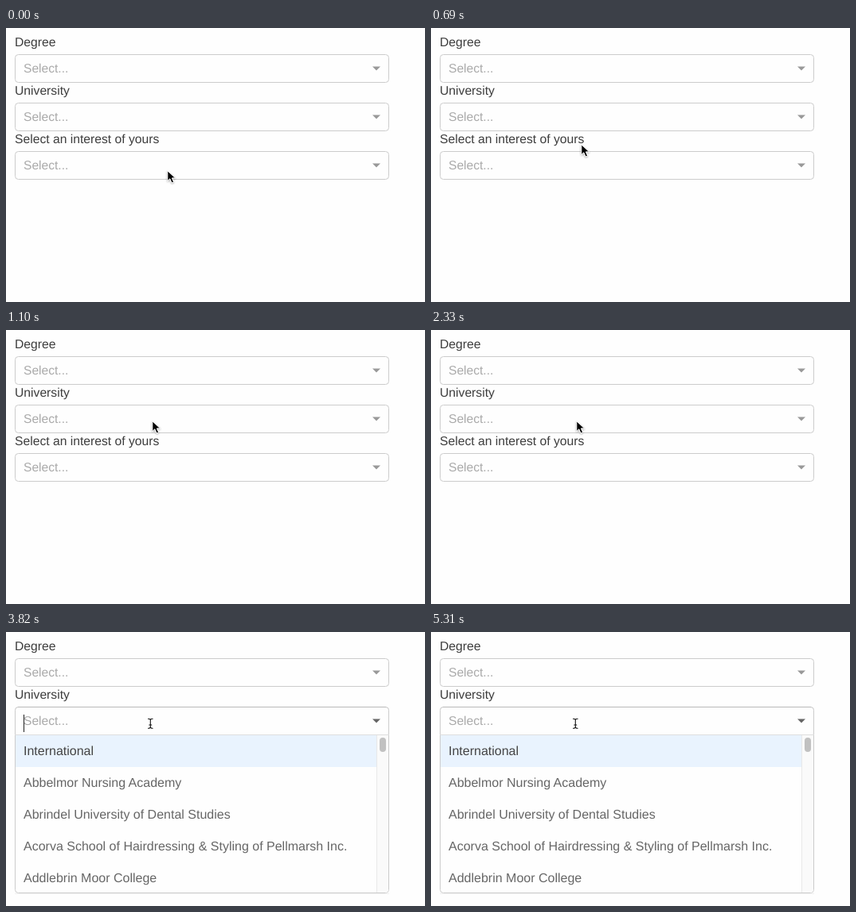
Animation, 526 px wide and 345 px high, one loop 8000 ms. Source, as an HTML page:

```html
<!DOCTYPE html>
<html lang="en">
<head>
<meta charset="utf-8">
<title>Select menus</title>
<style>
html, body { margin: 0; width: 100%; height: 100%; overflow: hidden; background: #fefefe; }
svg { display: block; width: 526px; height: 345px; }
text { font-family: "Liberation Sans", Arial, sans-serif; text-rendering: geometricPrecision; }
.label { font-size: 15.7px; fill: #3d3d3d; }
.hint { font-size: 15.6px; fill: #aaa; }
.option { font-size: 16px; fill: #666; }
.box { fill: #fefefe; stroke: #ccc; }
</style>
</head>
<body>
<svg viewBox="0 0 526 345">
  <defs>
    <clipPath id="listClip"><path d="M12 130H480V324Q480 328 476 328H16Q12 328 12 324Z"/></clipPath>
    <filter id="shade" x="-50%" y="-50%" width="200%" height="200%">
      <feDropShadow dx="0" dy="1" stdDeviation="0.8" flood-opacity="0.35"/>
    </filter>
  </defs>
  <g id="fields"></g>
  <g id="menu">
    <path d="M11 329.5H481" stroke="#000" stroke-opacity=".05"/>
    <path class="box" d="M11.5 129.5V324.5Q11.5 328.5 15.5 328.5H476.5Q480.5 328.5 480.5 324.5V129.5"/>
    <path class="box" d="M11.5 129.5V98.5Q11.5 94.5 15.5 94.5H476.5Q480.5 94.5 480.5 98.5V129.5"/>
    <path d="M15 94.5H477" stroke="#b9b9b9"/>
    <path d="M12 129.5H480" stroke="#dedede"/>
    <path d="M460 109.5h10l-5 5z" fill="#666"/>
    <text class="hint" x="22" y="117">Select...</text>
    <g id="list" clip-path="url(#listClip)">
      <rect x="12" y="130" width="454" height="40" fill="#e9f3fe"/>
      <rect x="465" y="130" width="15" height="198" fill="#fafafa"/>
      <path d="M465.5 130V328" stroke="#e8e8e8"/>
      <rect x="469" y="133" width="8" height="18" rx="4" fill="#c1c1c1"/>
    </g>
    <rect id="caret" x="22" y="104" width="1" height="22" fill="#222"/>
    <g fill="none" stroke-linecap="round">
      <path id="beamHalo" stroke="#fff" stroke-width="2.6"/>
      <path id="beam" stroke="#111" stroke-width="1.1"/>
    </g>
  </g>
  <g id="pointer" filter="url(#shade)">
    <path d="M.8 .8V13.6L3.8 10.8 6 16 8.6 14.9 6.4 9.9H10.6Z" fill="#000" stroke="#fff" stroke-width="1"/>
  </g>
</svg>
<script>
const LOOP = 8000, OPEN = 3820;
const labels = ["Degree", "University", "Select an interest of yours"];
const options = [
  "International",
  "Abbelmor Nursing Academy",
  "Abrindel University of Dental Studies",
  "Acorva School of Hairdressing & Styling of Pellmarsh Inc.",
  "Addlebrin Moor College"
];
// time, x, y of the pointer tip
const path = [
  [510, 202, 179], [690, 188, 146], [840, 185, 131],
  [1100, 183, 114], [2300, 183, 114], [2410, 180, 114]
];
const blinks = [[3820, 4330], [4800, 5310]];

const $ = id => document.getElementById(id);

function add(parent, tag, attrs, text) {
  const el = document.createElementNS("http://www.w3.org/2000/svg", tag);
  for (const key in attrs) el.setAttribute(key, attrs[key]);
  if (text) el.textContent = text;
  parent.appendChild(el);
  return el;
}

const fields = labels.map((label, i) => {
  const g = add($("fields"), "g", { transform: `translate(0 ${i * 61})` });
  add(g, "text", { class: "label", x: 11, y: 23 }, label);
  add(g, "rect", { class: "box", x: 11.5, y: 33.5, width: 469, height: 35, rx: 4 });
  add(g, "text", { class: "hint", x: 22, y: 56 }, "Select...");
  add(g, "path", { d: "M460 48.5h10l-5 5z", fill: "#999" });
  return g;
});

options.forEach((name, i) => {
  const el = add($("list"), "text", { class: "option", x: 22, y: 155 + i * 40 }, name);
  if (i === 0) el.style.fill = "#444";
});

const beamShape = "M178.5 109.3Q181.3 109.3 181.3 111V119.5Q181.3 121.3 178.5 121.3" +
  "M184.1 109.3Q181.3 109.3 181.3 111M184.1 121.3Q181.3 121.3 181.3 119.5M179.8 117H182.8";
$("beam").setAttribute("d", beamShape);
$("beamHalo").setAttribute("d", beamShape);

function pointerAt(t) {
  if (t <= path[0][0]) return path[0].slice(1);
  for (let i = 1; i < path.length; i++) {
    const [t0, x0, y0] = path[i - 1], [t1, x1, y1] = path[i];
    if (t < t1) {
      const k = (t - t0) / (t1 - t0);
      return [Math.round(x0 + (x1 - x0) * k), Math.round(y0 + (y1 - y0) * k)];
    }
  }
  return path[path.length - 1].slice(1);
}

const show = (el, on) => { el.style.display = on ? "" : "none"; };

function draw(t) {
  const open = t >= OPEN;
  show($("menu"), open);
  show(fields[2], !open);
  show($("pointer"), !open);
  show($("caret"), blinks.some(([a, b]) => t >= a && t < b));
  // the pointer rests until 540, then moves
  const [x, y] = pointerAt(t < 540 ? 0 : t);
  $("pointer").setAttribute("transform", `translate(${x} ${y})`);
}

let start = null;
function tick(now) {
  if (start === null) start = now;
  draw((now - start) % LOOP);
  requestAnimationFrame(tick);
}
draw(0);
requestAnimationFrame(tick);
</script>
</body>
</html>
```
